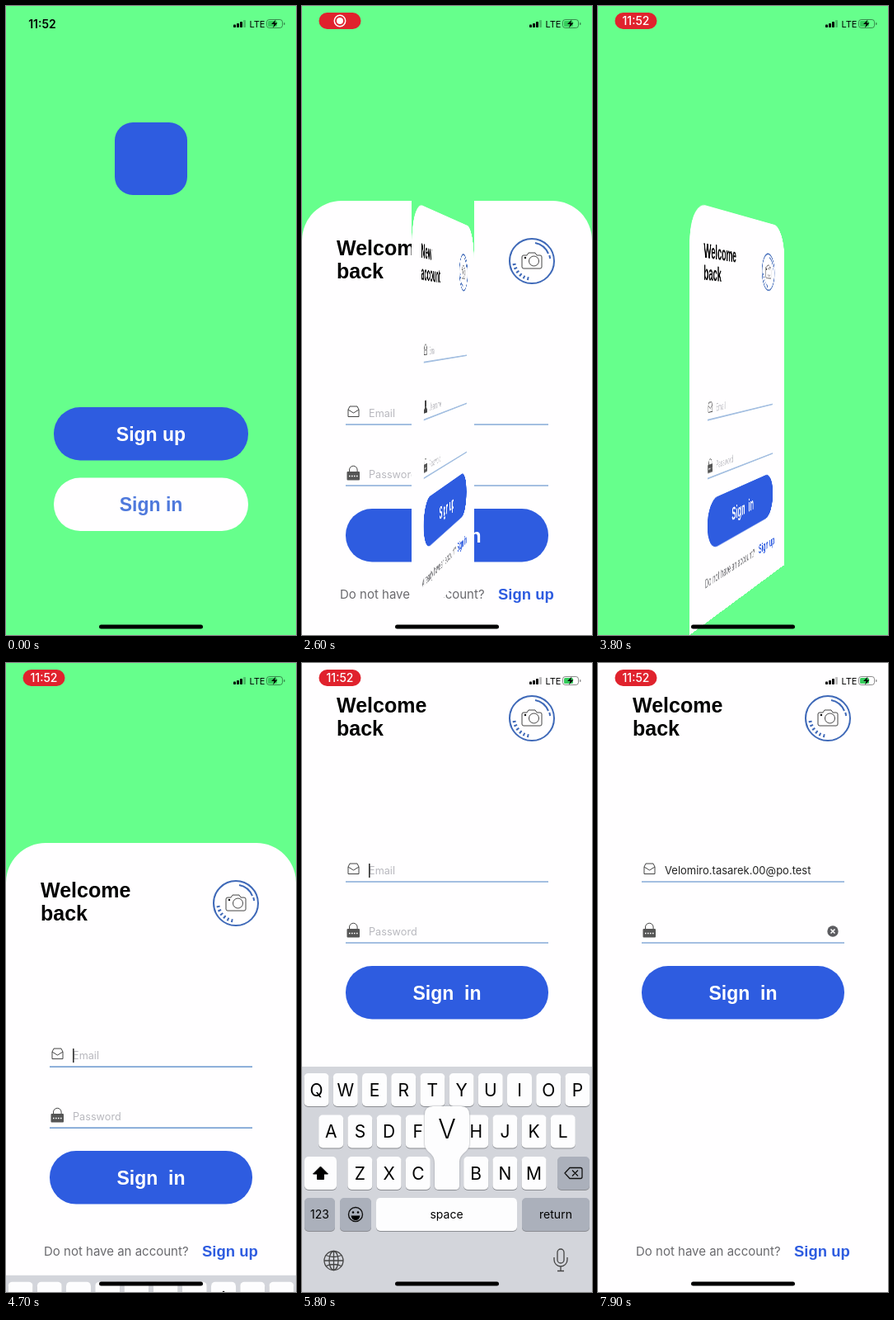
An HTML page for the animation above (8 s loop, 352 by 762 pixels).

```html
<!DOCTYPE html>
<html lang="en">
<head>
<meta charset="utf-8">
<title>Sign in flow</title>
<style>
  html, body { margin: 0; width: 100%; height: 100%; overflow: hidden; background: #66ff8c; }
  svg { position: absolute; left: 0; top: 0; width: 352px; height: 762px; }
  text { font-family: Inter, sans-serif; white-space: pre; }
  .bold { font-family: "Liberation Sans", Arial, sans-serif; font-weight: bold; }
  .mid { text-anchor: middle; }
  .hint { fill: #b8b8be; }
  .line { fill: none; stroke: #444; }
  .ring { fill: none; stroke: #3f69b8; stroke-width: 2; }
</style>
</head>
<body>
<script>
const BLUE = '#2e5ce0', GREEN = '#66ff8c', WHITE = '#fffeff';
const EMAIL = 'Velomiro.tasarek.00@po.test';
const LOOP = 8000, STEP = 100, FLIP = 770;

const clamp = (v, lo, hi) => Math.min(hi, Math.max(lo, v));
const progress = (t, start, length) => clamp((t - start) / length, 0, 1);
const smooth = u => u * u * (3 - 2 * u);

// Text placed by the vertical centre of its capitals.
const text = (s, x, cy, size, attrs = '') =>
  `<text x="${x}" y="${cy + size * 0.36}" font-size="${size}" ${attrs}>${s.replace('&', '&amp;')}</text>`;
const box = (x, y, w, h, r, fill, attrs = '') =>
  `<rect x="${x}" y="${y}" width="${w}" height="${h}" rx="${r}" fill="${fill}" ${attrs}/>`;
const button = (x, y, w, label, fill, color) =>
  box(x, y, w, 64.5, 32, fill) + text(label, x + w / 2, y + 32.5, 23, `class="bold mid" fill="${color}"`);

function layer(markup) {
  const svg = document.createElementNS('http://www.w3.org/2000/svg', 'svg');
  svg.setAttribute('viewBox', '0 0 352 762');
  svg.innerHTML = markup;
  document.body.append(svg);
  return svg;
}

const show = (el, on) => { el.style.display = on ? '' : 'none'; };

// Icons are drawn around the left end of a field's line.
const icons = {
  Email: '<path class="line" d="M56 -18l2 -4h9l2 4v8.500h-13zM56 -18l6.500 4 6.500 -4"/>',
  Username: '<circle cx="62.500" cy="-20" r="4.500" fill="#444"/><path d="M55 -8q0 -8 7.500 -8t7.500 8z" fill="#444"/>',
  Password: '<path class="line" d="M57.500 -17v-2a4.800 4.800 0 0 1 9.600 0v2"/>' + box(54.5, -17, 15.5, 10.5, 1, '#555') +
    '<path d="M57 -11.500h11" stroke="#fff" stroke-width="1.600" stroke-dasharray="1.600 1.400"/>'
};
const field = (name, y) => `<g transform="translate(0 ${y})">${icons[name]}
  ${text(name, 81, -14, 12.7, `class="hint ${name}"`)}
  <path d="M53 0h246" stroke="#4a82c4" stroke-width="1.200"/></g>`;

const camera = `<g transform="translate(279 309)">
  <circle class="ring" r="27"/>
  <path class="ring" d="M4 -22A22 22 0 0 1 20 -9M21.300 -7l.9 4"/>
  <path class="ring" style="stroke-width:4" stroke-dasharray="2 3" d="M-21.500 3A22 22 0 0 0 -2 21.500"/>
  <path class="line" d="M-10 -7h4l2 -3h8l2 3h4q2 0 2 2v12q0 2 -2 2h-20q-2 0 -2 -2v-12q0 -2 2 -2z"/>
  <circle class="line" cx="2.500" r="6"/><circle cx="-8" cy="-4" r="1.200"/></g>`;

const clearIcon = (cls, y) => `<g class="${cls}" transform="translate(285 ${y})">
  <circle r="6.700" fill="#5c5c60"/><path d="M-2.500 -2.500l5 5m0 -5l-5 5" stroke="#fff" stroke-width="1.500"/></g>`;

const page = (title, fields, action, question, link, extra = '') => layer(
  box(0, 0, 352, 762, 0, GREEN) +
  `<g class="card">${box(0, 236, 352, 1100, 48, WHITE, 'class="sheet"')}` +
  title.map((s, i) => text(s, 42, 293 + 28 * i, 25, 'class="bold"')).join('') +
  camera + fields.map(([name, y]) => field(name, y)).join('') +
  button(53, 609, 246, action, BLUE, '#fff') + extra + '</g>' +
  text(question, 46, 712.5, 15, 'fill="#6a6a6e"') +
  text(link, 238, 712.5, 18.5, `class="bold" fill="${BLUE}"`));

const home = layer(
  box(132, 141, 88, 88, 22, BLUE) +
  button(58, 486, 236, 'Sign up', BLUE, '#fff') +
  button(58, 571.5, 236, 'Sign in', WHITE, '#4f79dc'));

const signIn = page(['Welcome', 'back'], [['Email', 507], ['Password', 581]], 'Sign  in',
  'Do not have an account?', 'Sign up',
  text('', 81, 493, 13, 'class="typed" fill="#222"') + box(81, 485, 1.6, 17, 0, '#333', 'class="caret"') +
  clearIcon('clearEmail', 493) + clearIcon('clearPassword', 567));

const signUp = page(['New', 'account'], [['Email', 434], ['Username', 507], ['Password', 581]], 'Sign up',
  'Already have an account?', 'Sign in');

const keyboard = layer('');

const status = layer(
  text('11:52', 44, 21.5, 14, 'class="mid clock" font-weight="600"') +
  `<g class="pill">${box(20.5, 8, 51, 20, 10, '#e0222d', 'class="pillBack"')}
  <g class="record"><circle cx="46" cy="18" r="6.700" fill="none" stroke="#fff" stroke-width="1.500"/>
  <circle cx="46" cy="18" r="4" fill="#fff"/></g>
  ${text('11:52', 46, 18, 14, 'class="mid pillTime" fill="#fff" font-weight="500"')}</g>` +
  [3.5, 5, 7, 9].map((h, i) => box(276 + 4 * i, 26 - h, 3, h, 0.8, '#000', i > 2 ? 'opacity=".25"' : '')).join('') +
  text('LTE', 295.5, 22, 11) +
  box(316.5, 16.5, 19, 10, 3, 'none', 'stroke="#000" stroke-opacity=".45"') +
  box(318, 18, 11, 7, 1.5, '#35cb5b') + box(337, 20, 1.5, 3, 0.7, '#000', 'opacity=".45"') +
  '<path d="M327.500 16.500l-5.500 5.500h3.500l-1.500 4.500 5.500 -6h-3.500z"/>' +
  box(113, 749.5, 126, 5, 2.5, '#000'));

const LETTERS = ['qwertyuiop', 'asdfghjkl', 'zxcvbnm'];
const SYMBOLS = ['1234567890', '-/:;()$&@"', ".,?!'"];

const keyCap = (x, y, w, fill = '#fdfdfe') => box(x, y + 1, w, 40, 5, '#8b8d92') + box(x, y, w, 40, 5, fill);

function popup(char, cx, top) {
  const mid = clamp(cx, 29, 323), l = mid - 27, r = mid + 27;
  return `<path fill="#fdfdfe" style="filter:drop-shadow(0 0 1px #9a9ca2)" d="M${l + 10} ${top - 61}H${r - 10}
    q10 0 10 10V${top - 16}C${r} ${top - 4} ${cx + 15} ${top - 6} ${cx + 15} ${top + 8}V${top + 35}q0 5 -5 5H${cx - 10}
    q-5 0 -5 -5V${top + 8}C${cx - 15} ${top - 6} ${l} ${top - 4} ${l} ${top - 16}V${top - 51}q0 -10 10 -10z"/>` +
    text(char, mid, top - 34, 32, 'class="mid" font-weight="300"');
}

function drawKeyboard(pressed, caps) {
  const symbols = pressed && !/[a-z]/i.test(pressed);
  const gray = '#abb0bb';
  let caption = '', bubble = '';
  (symbols ? SYMBOLS : LETTERS).forEach((row, r) => {
    const wide = symbols && r === 2, pitch = wide ? 49 : 35.2, w = wide ? 43 : 30;
    const top = 497 + 50.5 * r;
    [...row].forEach((c, i) => {
      const char = caps ? c.toUpperCase() : c;
      const cx = 176 + (i - (row.length - 1) / 2) * pitch;
      caption += keyCap(cx - w / 2, top, w) + text(char, cx, top + 20, 21, 'class="mid"');
      if (char === pressed) bubble = popup(char, cx, top);
    });
  });
  const label = (s, x, size = 14) => text(s, x, 668, size, 'class="mid"');
  const shift = symbols ? text('#+=', 22.5, 618, 13, 'class="mid"')
    : `<path d="M22.500 610l9 9h-5v6.500h-8v-6.500h-5z" fill="${caps ? '#000' : 'none'}" stroke="#000"/>`;
  keyboard.innerHTML = box(0, 489, 352, 273, 0, '#d3d5db') + caption +
    keyCap(3, 598, 39, caps ? undefined : gray) + shift +
    keyCap(310, 598, 39, gray) +
    '<path class="line" style="stroke:#111" stroke-width="1.300" d="M319 618l6 -6.500h13q2 0 2 2v9q0 2 -2 2h-13zM328 614.500l7 7m0 -7l-7 7"/>' +
    keyCap(3, 648, 37, gray) + label(symbols ? 'ABC' : '123', 21.5) +
    keyCap(46, 648, 38, gray) +
    '<circle class="line" style="stroke:#111" stroke-width="1.400" cx="65" cy="668" r="8.500"/><path d="M59.500 669.500h11q-1 5.500 -5.500 5.500t-5.500 -5.500z"/><circle cx="62" cy="665.500" r="1.300"/><circle cx="68" cy="665.500" r="1.300"/>' +
    keyCap(90, 648, 171) + label('space', 175.5) +
    keyCap(267, 648, 82, gray) + label('return', 308) +
    '<g class="line" stroke-width="1.300"><circle cx="38.500" cy="724" r="11.500"/><ellipse cx="38.500" cy="724" rx="5.500" ry="11.500"/><path d="M38.500 712.500v23M27 724h23M29 717.500q9.500 4 19 0M29 730.500q9.500 -4 19 0"/>' +
    '<rect x="310" y="710" width="8" height="17" rx="4"/><path d="M306 720v3a8 8 0 0 0 16 0v-3M314 731v5.500m-4 0h8"/></g>' +
    bubble;
}

// The page swings on its vertical axis, pushed back so its near edge stays on the screen plane.
function swing(el, degrees) {
  const depth = 176 * Math.abs(Math.sin(degrees * Math.PI / 180));
  el.style.transform = degrees ? `perspective(1140px) translateZ(${-depth}px) rotateY(${degrees}deg)` : 'none';
}

const part = (root, name) => root.querySelector('.' + name);

function render(t) {
  // Status bar
  show(part(status, 'clock'), t < 400);
  show(part(status, 'pill'), t >= 400);
  show(part(status, 'record'), t < 3100);
  show(part(status, 'pillTime'), t >= 3100);
  const pulse = t < 3100 ? 0.5 + 0.5 * Math.cos((t - 2600) / 1300 * Math.PI) : 1;
  part(status, 'pillBack').setAttribute('fill', `rgb(${200 + 24 * pulse},34,45)`);

  // Pages
  const there = 180 * smooth(progress(t, 2175, FLIP));
  const back = 180 * smooth(progress(t, 3353, FLIP));
  show(home, t < 1500);
  show(signUp, there > 90 && back < 90);
  show(signIn, t >= 1000 && (back === 0 || back >= 90));
  swing(signUp, back ? -back : 180 - there);
  if (t < 1500) {
    signIn.style.transform = `translateY(${526 * (1 - progress(t, 950, 500)) ** 3}px)`;
  } else {
    swing(signIn, back ? 180 - back : 0);
  }

  // Keyboard pushes the card up
  const lift = smooth(progress(t, 4650, 300));
  const cardTop = 236 - 242 * lift;
  part(signIn, 'card').setAttribute('transform', `translate(0 ${-242 * lift})`);
  part(signIn, 'sheet').setAttribute('rx', clamp(cardTop, 0, 48));
  show(keyboard, lift > 0 && t < 6900);
  keyboard.style.transform = `translateY(${273 * (1 - lift)}px)`;

  // Typing
  const count = t < 5900 ? 0 : Math.min(EMAIL.length, 1 + Math.floor((t - 5900) * 26 / 900));
  drawKeyboard(t >= 5800 ? EMAIL[count] : '', t >= 5500 && t < 5900);
  const typed = part(signIn, 'typed'), caret = part(signIn, 'caret');
  typed.textContent = EMAIL.slice(0, count);
  show(part(signIn, 'Email'), count === 0);
  show(caret, lift > 0 && t < 6900);
  caret.setAttribute('x', 81 + (count ? typed.getComputedTextLength() : 0));
  show(part(signIn, 'clearEmail'), count > 0 && t < 6900);
  show(part(signIn, 'Password'), t < 7200);
  show(part(signIn, 'clearPassword'), t >= 7200);
}

let last = -1;
function tick() {
  const t = Math.floor(performance.now() % LOOP / STEP) * STEP;
  if (t !== last) render(last = t);
  requestAnimationFrame(tick);
}
tick();
</script>
</body>
</html>
```
